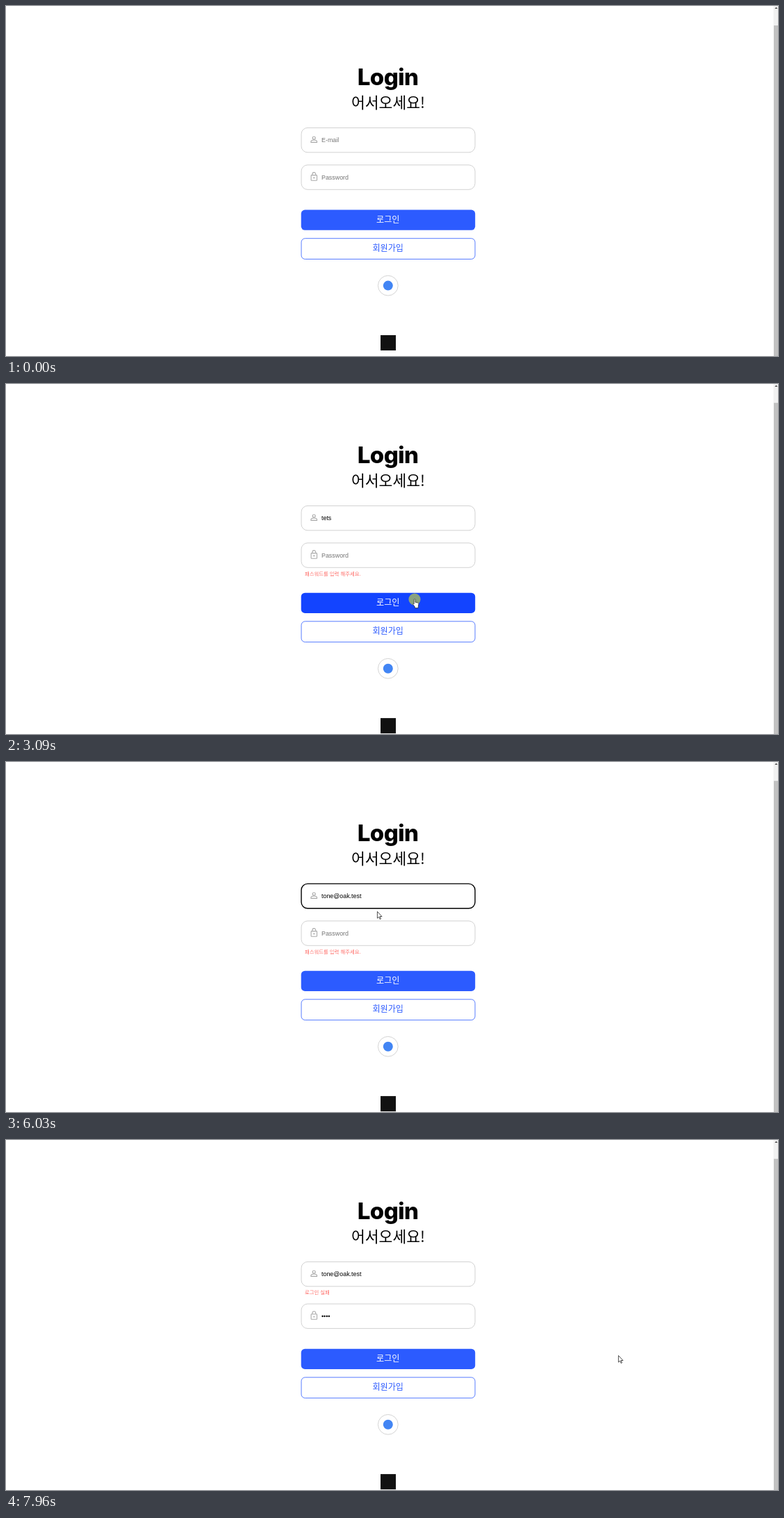
Recreate the animation shown at these times as an HTML page. Size 1111x504 px, loop 8 s.

```html
<!DOCTYPE html>
<html lang="ko">
<head>
<meta charset="utf-8">
<title>Login</title>
<style>
  html, body { margin: 0; width: 100%; height: 100%; overflow: hidden; background: #fff; }
  svg { display: block; }
  .ko { font-family: 'Noto Sans CJK KR', 'Noto Sans CJK JP', sans-serif; }
  .mid { text-anchor: middle; }
  .btn { font-size: 12.1px; font-weight: 500; }
  .err { font-size: 7.35px; font-weight: 300; fill: #ff6b66; }
  .value { font: 8.89px 'Liberation Sans', Arial, sans-serif; }
  .icon { fill: none; stroke: #a9a9a9; stroke-width: 1.1; }
  .field { fill: #fff; }
</style>
</head>
<body>
<svg width="1111" height="504" viewBox="0 0 1111 504">
  <text class="mid" x="549.5" y="114" font-family="Inter, sans-serif" font-size="33" font-weight="800" letter-spacing="-.6">Login</text>
  <text class="ko mid" x="550" y="147.3" font-size="21.5">어서오세요!</text>

  <rect id="mailBox" class="field" x="425" y="175.4" width="250" height="35.4" rx="9"/>
  <g class="icon">
    <circle cx="443.2" cy="190" r="2"/>
    <path d="M438.9 196.4v-1.2c0-2.9 8.6-2.9 8.6 0v1.2z"/>
  </g>
  <rect id="selection" x="454" y="188" width="14.5" height="10.5" fill="#3390ff"/>
  <text id="mail" class="value" x="454" y="196.2"></text>
  <path id="caret" d="M457.5 188v10" stroke="#a33" stroke-width=".8"/>
  <text id="mailError" class="ko err" x="430" y="222.4"></text>

  <g id="passGroup">
    <rect id="passBox" class="field" x="425" y="228.9" width="250" height="35.4" rx="9"/>
    <g class="icon">
      <rect x="439.1" y="243.6" width="8.4" height="7.6" rx=".8"/>
      <path d="M440.9 243.6v-1.6a2.4 2.4 0 0 1 4.8 0v1.6"/>
      <circle cx="443.3" cy="247.4" r=".5"/>
    </g>
    <text id="pass" class="value" x="454" y="249.7"></text>
    <text id="passError" class="ko err" x="430" y="276">패스워드를 입력 해주세요.</text>
  </g>

  <g id="actions">
    <rect id="login" x="424.7" y="293.6" width="250.5" height="29.2" rx="5.5"/>
    <text class="ko mid btn" x="549.7" y="311.8" fill="#fff">로그인</text>
    <rect x="425" y="334.7" width="250" height="29.8" rx="5.5" fill="#fff" stroke="#2c5bff" stroke-width=".8"/>
    <text class="ko mid btn" x="549.7" y="353" fill="#2c5bff">회원가입</text>
    <circle cx="549.8" cy="402.6" r="14.4" fill="#fff" stroke="#d4d4d4"/>
    <circle cx="549.8" cy="402.6" r="7" fill="#4285f4"/>
    <rect x="539" y="474" width="22" height="22" fill="#111"/>
  </g>

  <rect x="1104.5" width="6.5" height="504" fill="#f1f1f1"/>
  <path d="M1106.4 4l2-2.4 2 2.4z" fill="#505050"/>
  <rect id="thumb" x="1105" width="6" height="480" fill="#c1c1c1"/>

  <g id="cursor">
    <circle id="press" r="8.6" fill="#ff0" fill-opacity=".5"/>
    <path id="arrow" d="M.4.4v9.6l2.2-2 1.5 3.4 1.4-.6-1.5-3.3h3z" fill="#fff" stroke="#222" stroke-width=".8"/>
    <path id="hand" d="M-.8.6c0-1.4 1.8-1.4 1.8 0v3.6l4 .9c.8.3 1 .8.9 1.6l-.7 4.1v1.8H.4v-1.7l-2.5-3.3c-.7-1.2.5-1.7 1.3-.8z" fill="#fff" stroke="#222" stroke-width=".7"/>
    <path id="beam" d="M-2-4.3h1.5l.5.5.5-.5H2M0-4v8M-2 4.3h1.5l.5-.5.5.5H2" fill="none" stroke="#333" stroke-width=".9"/>
  </g>
</svg>
<script>
const LOOP = 8000, ROW = 7.1;
const el = id => document.getElementById(id);
const show = (id, on) => { el(id).style.display = on ? '' : 'none'; };
const during = (t, ...spans) => spans.some(([a, b]) => t >= a && t < b);
const move = (id, x, y) => el(id).setAttribute('transform', `translate(${x} ${y})`);

// time, x, y of the pointer tip
const path = [
  [70, 848, 408], [330, 612, 277], [470, 601, 298], [930, 601, 298], [1010, 599, 292],
  [1130, 599, 292], [1270, 560, 264], [1470, 560, 264], [1530, 530, 192],
  [2750, 530, 192], [3020, 588, 310], [3220, 588, 310], [3420, 560, 264],
  [3690, 560, 264], [3820, 530, 192], [5970, 530, 192], [6030, 534, 215],
  [6160, 537, 246], [6620, 537, 246], [6820, 547, 278], [6880, 548, 286],
  [7420, 548, 286], [7500, 575, 305], [7640, 600, 310], [7950, 881, 310]
];

const typed = (text, times) => times.map((t, i) => [t, text.slice(0, i + 1)]);
const mailSteps = [
  [0, ''],
  ...typed('tets', [2000, 2210, 2480, 2610]),
  ...typed('tone@oak.test', [4090, 4180, 4270, 4360, 4620, 4820, 4890, 4950, 5090, 5160, 5300, 5400, 5490])
];
const passSteps = [[0, ''], ...typed('••••', [7080, 7150, 7210, 7280])];
const errorSteps = [
  [0, ''], [1000, '아이디를 입력 해주세요.'], [2000, ''],
  [3160, '아이디를 입력 해주세요.'], [4090, ''], [7700, '로그인 실패']
];
const at = (steps, t) => steps.filter(s => s[0] <= t).pop()[1];

function pointer(t) {
  const i = path.findIndex(p => p[0] > t);
  if (i < 0) return path[path.length - 1].slice(1);
  if (i === 0) return path[0].slice(1);
  const [t0, x0, y0] = path[i - 1], [t1, x1, y1] = path[i];
  const k = (t - t0) / (t1 - t0);
  return [x0 + (x1 - x0) * k, y0 + (y1 - y0) * k];
}

function value(id, text, hint) {
  el(id).textContent = text || hint;
  el(id).setAttribute('fill', text ? '#000' : '#757575');
}

function border(id, focused) {
  el(id).setAttribute('stroke', focused ? '#000' : '#d2d2d2');
  el(id).setAttribute('stroke-width', focused ? 1.4 : 1);
}

function draw(t) {
  const mail = at(mailSteps, t), mailError = at(errorSteps, t);
  const passError = t >= 1000 && t < 7080;
  const passShift = mailError ? ROW : 0;
  const shift = passShift + (passError ? ROW : 0);
  const selected = during(t, [3890, 4090]);

  value('mail', mail, 'E-mail');
  if (selected) el('mail').setAttribute('fill', '#fff');
  value('pass', at(passSteps, t), 'Password');
  border('mailBox', during(t, [1530, 2960], [3820, 6290]));
  border('passBox', during(t, [6290, 7560]));
  show('selection', selected);
  show('caret', during(t, [4090, 4180]));
  el('mailError').textContent = mailError;
  show('passError', passError);
  move('passGroup', 0, passShift);
  move('actions', 0, shift);
  el('thumb').setAttribute('y', shift ? 27.2 : 28);

  const [x, y] = pointer(t);
  const over = (top, bottom) => x > 425 && x < 675 && y > top && y < bottom;
  const onLogin = over(293.6 + shift, 322.8 + shift);
  const onLink = onLogin || over(334.7 + shift, 364.5 + shift);
  const onField = over(175, 211) || over(229 + passShift, 264 + passShift);
  el('login').setAttribute('fill', onLogin ? '#1344ff' : '#2c5bff');
  show('cursor', t >= 70);
  move('cursor', x, y);
  show('hand', onLink);
  show('beam', onField);
  show('arrow', !onLink && !onField);
  show('press', during(t, [930, 1000], [1470, 1530], [3020, 3160], [3820, 3890], [6230, 6360], [7540, 7620]));
}

let start;
function tick(now) {
  start ??= now;
  draw((now - start) % LOOP);
  requestAnimationFrame(tick);
}
draw(0);
requestAnimationFrame(tick);
</script>
</body>
</html>
```
